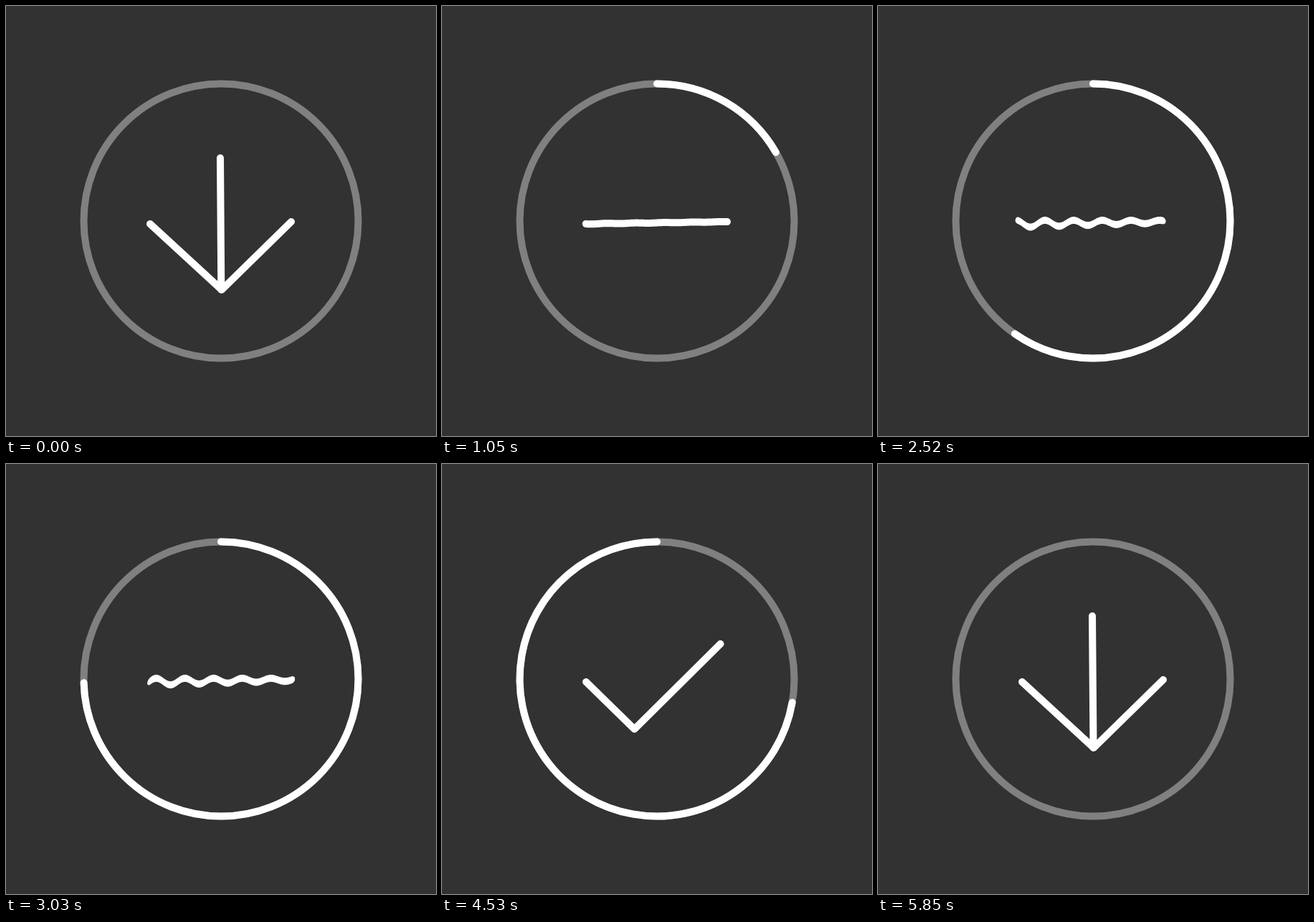
Recreate the animation shown at these times as an HTML page with a canvas. Size 600 by 600 pixels, loop 6720 ms.

```html
<!DOCTYPE html>
<html lang="en">
<head>
<meta charset="utf-8">
<title>Download button</title>
<style>
  html, body { margin: 0; width: 100%; height: 100%; overflow: hidden; background: #323232; }
  canvas { display: block; width: 600px; height: 600px; }
</style>
</head>
<body>
<canvas id="stage" width="600" height="600"></canvas>
<script>
const ctx = document.getElementById('stage').getContext('2d');
const STEP = 30, LOOP = 224, TAU = Math.PI * 2;

// Linear progress of n between two steps, clamped to 0..1
const ramp = (n, from, to) => Math.min(1, Math.max(0, (n - from) / (to - from)));
const mix = (a, b, p) => a + (b - a) * p;
const mixPoints = (a, b, p) => a.map((pt, i) => pt.map((v, k) => mix(v, b[i][k], p)));

// Left end, vertex and right end of each pose
const ARROW = [[201, 304], [301, 396], [398, 301]];
const FLAT = [[201, 304], [301, 302.8], [398, 301]];
const CHECK = [[201, 304], [268.5, 370], [388.5, 251]];

function line(points) {
  ctx.beginPath();
  points.forEach(([x, y]) => ctx.lineTo(x, y));
  ctx.stroke();
}

function ring(from, to, color) {
  ctx.strokeStyle = color;
  ctx.beginPath();
  ctx.arc(300, 300, 191.5, from * TAU - TAU / 4, to * TAU - TAU / 4);
  ctx.stroke();
}

// A round-capped bar whose columns are shifted up and down by a travelling sine
function wave(n, level) {
  const crest = 213 + (n - 66) * 10 / 3;
  const sway = level * (4 * Math.sin(TAU * (crest - 206.2) / 40) - 1);
  const left = 201 + sway, right = 398 + sway * 0.3;
  const top = [], bottom = [];
  for (let x = left - 5; x <= right + 5; x += 0.5) {
    const p = ramp(x, left, right);
    const over = Math.max(left - x, x - right, 0);
    const half = Math.sqrt(Math.max(0, 25 - over * over));
    const shift = level * mix(5, 2, p) * Math.cos(TAU * (x - crest) / 40);
    const y = mix(304, 301, p) - shift;
    top.push([x, y - half]);
    bottom.unshift([x, y + half]);
  }
  ctx.beginPath();
  top.concat(bottom).forEach(([x, y]) => ctx.lineTo(x, y));
  ctx.fill();
}

function stem(n) {
  if (n <= 16) {
    const shrink = ramp(n, 0, 8), rise = ramp(n, 8, 16);
    const end = y => mix(mix(y, 304, shrink), 108.5, rise);
    line([[mix(299, 300, shrink), end(212)], [300.3, end(396) + 0.01]]);
  } else if (n > 180) {
    const p = ramp(n, 180, 195);
    line([[mix(300.5, 299, p), mix(396, 212, p)], [300.5, 396]]);
  }
}

function head(n) {
  const level = ramp(n, 34, 46) * (1 - ramp(n, 117, 130));
  if (level > 0) wave(n, level);
  else if (n < 100) line(mixPoints(ARROW, FLAT, ramp(n, 15, 27)));
  else if (n < 170) line(mixPoints(FLAT, CHECK, ramp(n, 130, 140)));
  else line(mixPoints(CHECK, ARROW, ramp(n, 170, 180)));
}

function draw(n) {
  ctx.fillStyle = '#323232';
  ctx.fillRect(0, 0, 600, 600);
  ctx.lineWidth = 10;
  ctx.lineCap = ctx.lineJoin = 'round';
  ring(0, 1, '#808080');

  const start = ramp(n, 144.15, 168.85), end = ramp(n, 16, 130);
  if (end > start) ring(start, end, '#fff');

  ctx.strokeStyle = ctx.fillStyle = '#fff';
  stem(n);
  head(n);
}

const t0 = performance.now();
function tick() {
  draw(Math.floor(Math.max(0, performance.now() - t0) / STEP) % LOOP);
  requestAnimationFrame(tick);
}
tick();
</script>
</body>
</html>
```
